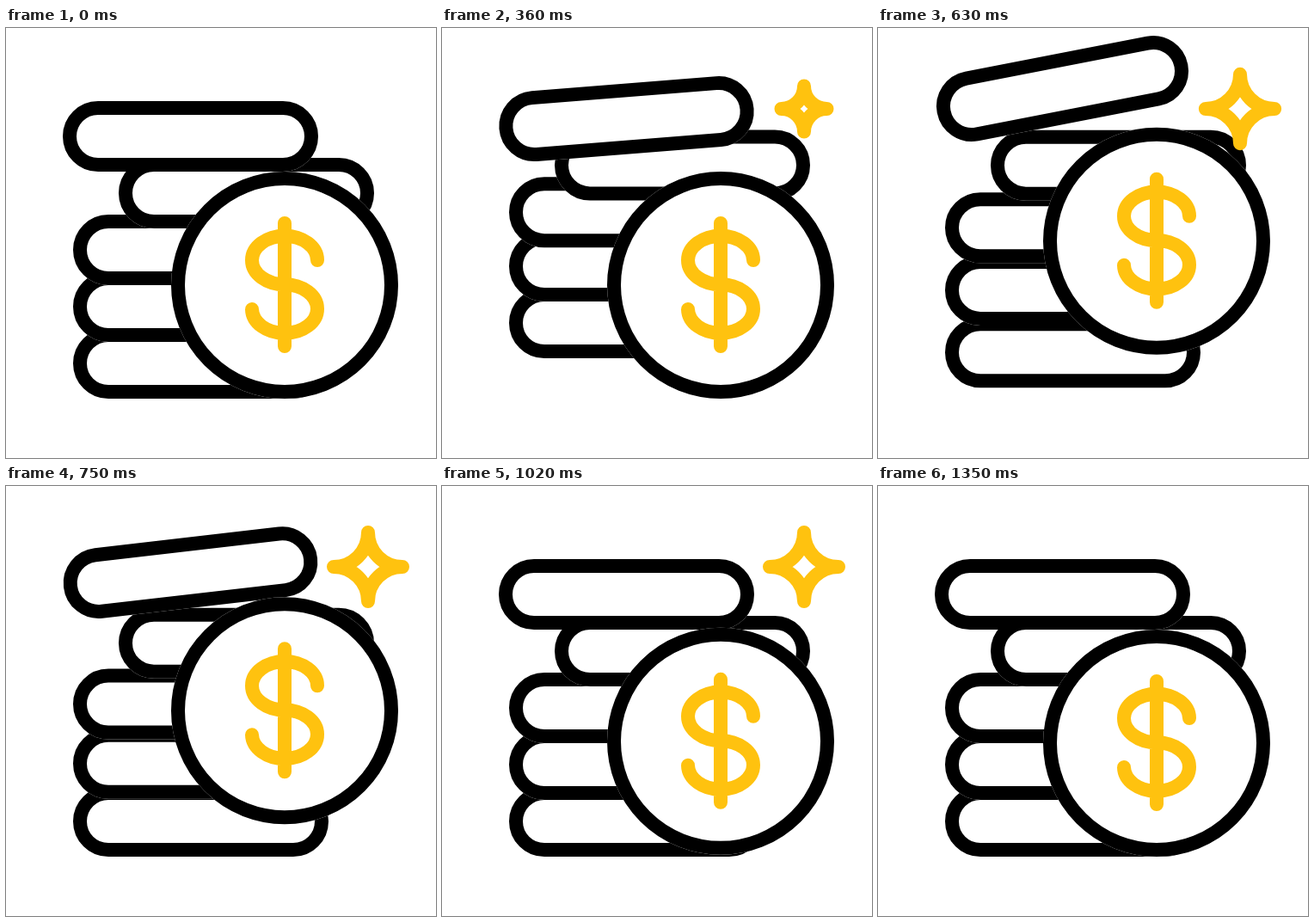
Recreate the animation shown at these times as an HTML page with a canvas. Size 500 px wide and 500 px high, loop 1.8 s.

```html
<!DOCTYPE html>
<html lang="en">
<head>
<meta charset="utf-8">
<title>Coin stack</title>
<style>
  html, body { margin: 0; height: 100%; overflow: hidden; background: #fff; }
  canvas { display: block; width: 100vmin; height: 100vmin; }
</style>
</head>
<body>
<canvas id="stage" width="500" height="500"></canvas>
<script>
const ctx = document.getElementById('stage').getContext('2d');
const LOOP = 1800, STEP = 30, GOLD = '#ffc20f';

// Eased progress from 0 to 1; a tail above 1 settles more gently.
function ease(t, start, end, tail = 1) {
  const u = Math.min(1, Math.max(0, (t - start) / (end - start)));
  const v = 1 - (1 - u) ** tail;
  return v * v * (3 - 2 * v);
}

// Bottom to top: centre, height of the hop, times of rise and fall.
const bars = [
  { x: 226.5, y: 390, hop: 47, up: [0, 285], down: [400, 750] },
  { x: 226.5, y: 324, hop: 47, up: [60, 345], down: [433, 783] },
  { x: 226.5, y: 258, hop: 47, up: [120, 405], down: [466, 816] },
  { x: 279.5, y: 192, hop: 47, up: [180, 465], down: [500, 850] },
  { x: 214.5, y: 126, hop: 63.5, up: [250, 540], down: [553, 900], tilt: 11 }
];

function outlined(path) {
  ctx.fillStyle = ctx.strokeStyle = '#fff';
  ctx.fill(path);
  ctx.stroke(path);
  ctx.strokeStyle = '#000';
  ctx.stroke(path);
}

const barPath = new Path2D();
barPath.roundRect(-140.5, -33, 281, 66, 33);
const coinPath = new Path2D();
coinPath.arc(0, 0, 124, 0, 2 * Math.PI);
const dollarPath = new Path2D(
  'M0-72V71M38-29A38 28.3 0 1 0 0-.7A38 28.3 0 1 1-38 28');

function drawBar(bar, t) {
  const lift = ease(t, ...bar.up) - ease(t, ...bar.down);
  const tilt = (bar.tilt || 0) * (ease(t, 150, 626) - ease(t, 635, 900));
  ctx.save();
  ctx.translate(bar.x, bar.y - bar.hop * lift);
  ctx.rotate(-tilt * Math.PI / 180);
  outlined(barPath);
  ctx.restore();
}

function drawCoin(t) {
  const lift = ease(t, 370, 602) - ease(t, 600, 1110, 1.21);
  ctx.save();
  ctx.translate(324, 299 - 52 * lift);
  outlined(coinPath);
  ctx.strokeStyle = GOLD;
  ctx.stroke(dollarPath);
  ctx.restore();
}

function drawSparkle(t) {
  const r = 53 * (ease(t, 240, 480) - ease(t, 1140, 1350))
          - 13 * (ease(t, 480, 640) - ease(t, 1020, 1140));
  if (r < 0.01) return;
  ctx.save();
  ctx.translate(421, 94);
  ctx.strokeStyle = GOLD;
  ctx.beginPath();
  for (let i = 0; i < 4; i++) {
    const a = i * Math.PI / 2;
    const corner = a + Math.PI / 4;
    ctx.arc(r * Math.SQRT2 * Math.cos(corner), r * Math.SQRT2 * Math.sin(corner),
            r, a - Math.PI / 2, a - Math.PI, true);
  }
  ctx.closePath();
  ctx.stroke();
  ctx.restore();
}

function draw(t) {
  ctx.fillStyle = '#fff';
  ctx.fillRect(0, 0, 500, 500);
  ctx.lineWidth = 16;
  ctx.lineCap = ctx.lineJoin = 'round';
  bars.forEach(bar => drawBar(bar, t));
  drawCoin(t);
  drawSparkle(t);
}

const begin = performance.now();
function tick() {
  const t = (performance.now() - begin) % LOOP;
  draw(Math.floor(t / STEP) * STEP);
  requestAnimationFrame(tick);
}
tick();
</script>
</body>
</html>
```
